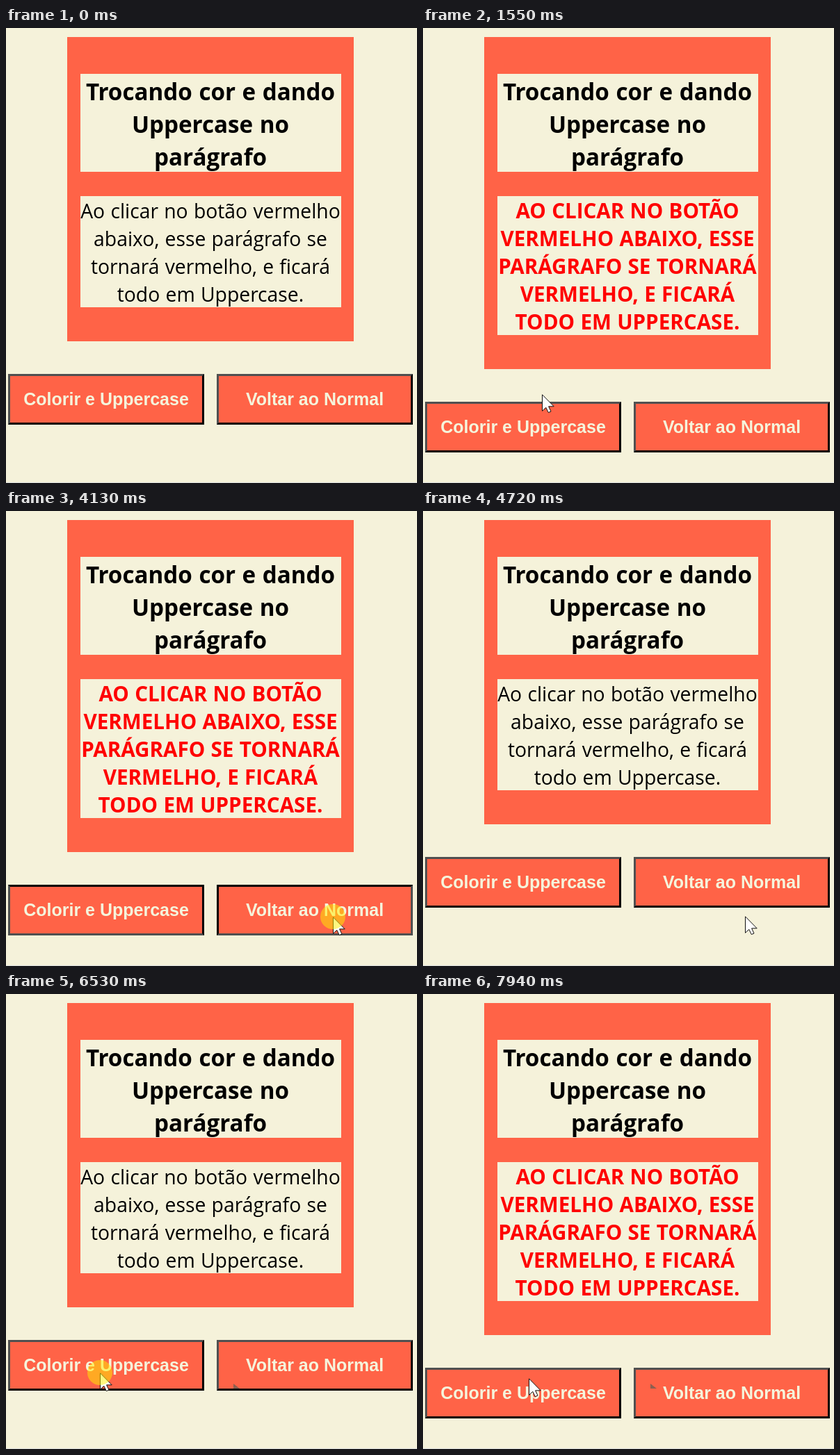
These frames come from a looping animation (591x655 px, 8000 ms). An HTML page:

```html
<!DOCTYPE html>
<html lang="pt-BR">
<head>
<meta charset="utf-8">
<title>Uppercase no parágrafo</title>
<style>
  :root { --beige: #f5f2da; --tomato: #ff6347; --light: #505050; }
  html, body { margin: 0; width: 100%; height: 100%; overflow: hidden; background: var(--beige); }
  div { position: absolute; box-sizing: border-box; }
  #card { left: 88px; top: 13px; width: 412px; height: 438px; background: var(--tomato); }
  .panel { left: 19px; width: 375px; background: var(--beige); }
  #head { top: 53px; height: 141px; }
  #para { top: 229px; height: 160px; }
  .btn {
    top: 498px; width: 282px; height: 73px; background: var(--tomato);
    border: 3px solid; border-color: var(--light) #000 #000 var(--light);
  }
  #paint { left: 3px; }
  #reset { left: 303px; }
  #foot { left: 0; top: 654px; width: 591px; height: 1px; background: #dcdfdf; }
  svg { position: absolute; left: 0; top: 0; }
  text { text-anchor: middle; }
  .title, .caps { font-family: "Open Sans", "Noto Sans", sans-serif; font-weight: 700; }
  .title { font-size: 33.2px; word-spacing: .9px; }
  .plain { font: 28.3px "Open Sans", "Noto Sans", sans-serif; word-spacing: .9px; }
  .caps { font-size: 29.6px; word-spacing: .6px; fill: #f00; }
  .label { font: bold 25px "Liberation Sans", Arial, sans-serif; fill: #f5f5dc; }

  .upper #card { height: 478px; }
  .upper #para { height: 200px; }
  .upper .btn { top: 538px; }
  .upper #labels { transform: translateY(40px); }
  .upper .plain, body:not(.upper) .caps { display: none; }
  .pressed #reset { border-color: #000 var(--light) var(--light) #000; }
  .pressed #paint { border-color: #000 #000 var(--light) var(--light); }
</style>
</head>
<body>
<div id="card">
  <div id="head" class="panel"></div>
  <div id="para" class="panel"></div>
</div>
<div id="paint" class="btn"></div>
<div id="reset" class="btn"></div>
<div id="foot"></div>
<svg width="591" height="655" viewBox="0 0 591 655">
  <g class="title">
    <text x="294" y="104">Trocando cor e dando</text>
    <text x="294" y="151">Uppercase no</text>
    <text x="294" y="198">parágrafo</text>
  </g>
  <g class="plain">
    <text x="294" y="274">Ao clicar no botão vermelho</text>
    <text x="294" y="314">abaixo, esse parágrafo se</text>
    <text x="294" y="354">tornará vermelho, e ficará</text>
    <text x="294" y="394">todo em Uppercase.</text>
  </g>
  <g class="caps">
    <text x="294" y="274">AO CLICAR NO BOTÃO</text>
    <text x="294" y="314">VERMELHO ABAIXO, ESSE</text>
    <text x="294" y="354">PARÁGRAFO SE TORNARÁ</text>
    <text x="294" y="394">VERMELHO, E FICARÁ</text>
    <text x="294" y="434">TODO EM UPPERCASE.</text>
  </g>
  <g id="labels" class="label">
    <text x="144" y="543">Colorir e Uppercase</text>
    <text x="444" y="543">Voltar ao Normal</text>
  </g>
  <path id="trace" d="M327 561v7h9z" fill="#8d5f50"/>
  <g id="cursor">
    <path d="M.5 .8V24.3L5.8 19.3L9.3 26.6L13 25L9.6 17.8H17.2Z" fill="#fff" stroke="#111"/>
    <circle id="click" r="18" fill="#fff000" fill-opacity=".5"/>
  </g>
</svg>
<script>
  const LOOP = 8000;
  const linear = p => p;
  const easeIn = p => p ** 1.6;
  const easeOut = p => 1 - (1 - p) ** 1.5;
  const smooth = p => p * p * (3 - 2 * p);

  // Each move runs along a quadratic curve in discrete steps.
  const moves = [
    { start: 850, end: 1400, steps: 9, ease: easeOut, from: [275, 668], via: [185, 600], to: [171, 527] },
    { start: 2150, end: 2920, steps: 12, ease: easeIn, from: [171, 527], via: [304, 588], to: [438, 598] },
    { start: 2990, end: 3060, steps: 2, ease: linear, from: [438, 598], via: [453, 599], to: [468, 600] },
    { start: 3720, end: 3860, steps: 3, ease: linear, from: [468, 600], via: [454, 592], to: [470, 584] },
    { start: 4720, end: 5470, steps: 12, ease: smooth, from: [470, 584], via: [302, 552], to: [135, 545] },
    { start: 7190, end: 7190, steps: 1, ease: linear, from: [135, 545], via: [135, 545], to: [136, 545] },
    { start: 7330, end: 7940, steps: 8, ease: linear, from: [136, 545], via: [144, 548], to: [152, 553] }
  ];
  const clicks = [[1470, 1550], [4060, 4260], [6530, 6600]];

  const byId = id => document.getElementById(id);
  const cursor = byId("cursor"), click = byId("click"), trace = byId("trace");
  const within = (t, a, b) => t >= a && t < b;
  const show = (el, on) => el.setAttribute("visibility", on ? "visible" : "hidden");

  function position(t) {
    const m = moves.filter(move => t >= move.start).pop();
    if (!m) return null;
    const step = m.steps > 1 ? (t - m.start) * (m.steps - 1) / (m.end - m.start) : 0;
    const done = Math.min(m.steps, Math.floor(step + 1e-6) + 1);
    const u = m.ease(done / m.steps), v = 1 - u;
    return m.from.map((a, i) => Math.round(v * v * a + 2 * u * v * m.via[i] + u * u * m.to[i]));
  }

  function draw(t) {
    const at = position(t);
    show(cursor, at);
    if (at) cursor.setAttribute("transform", `translate(${at})`);
    show(click, at && clicks.some(([a, b]) => within(t, a, b)));
    show(trace, t >= 5130);
    document.body.classList.toggle("upper", within(t, 1550, 4260) || t >= 6600);
    document.body.classList.toggle("pressed", within(t, 4130, 4260));
  }

  const begin = performance.now();
  function tick() {
    draw((performance.now() - begin) % LOOP);
    requestAnimationFrame(tick);
  }
  tick();
</script>
</body>
</html>
```
